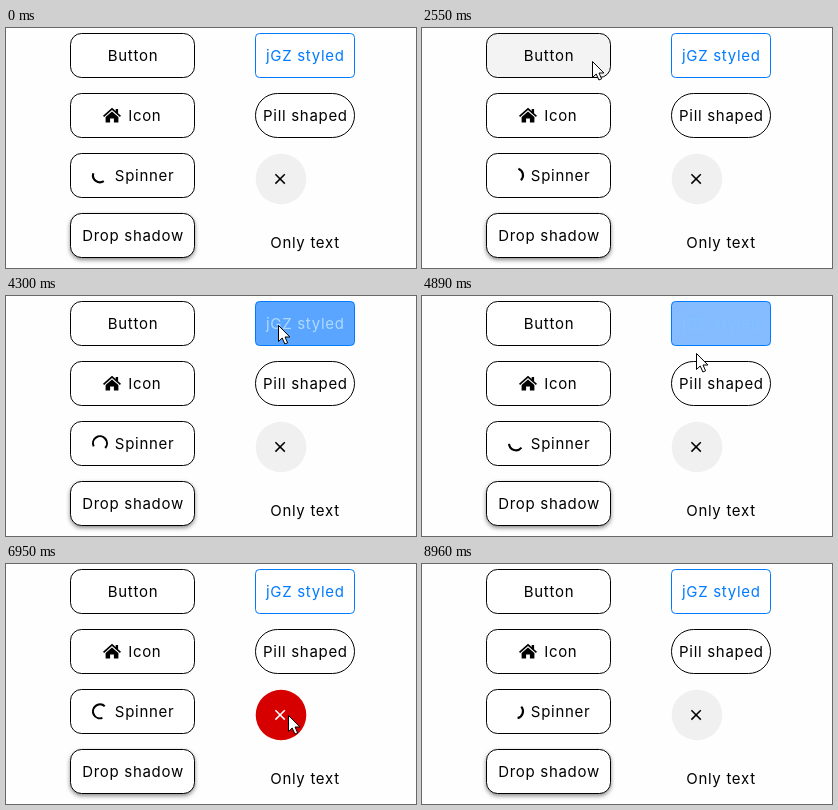
These frames come from a looping animation (410x240 px, 9030 ms). An HTML page:

```html
<!DOCTYPE html>
<html lang="en">
<head>
<meta charset="utf-8">
<title>Button styles</title>
<style>
html, body { margin: 0; width: 100%; height: 100%; overflow: hidden; background: #fefefe; }
svg { display: block; width: 410px; height: 240px; }
text { font: 400 15px Inter, "Open Sans", sans-serif; letter-spacing: .7px; text-anchor: middle; fill: #000; }
.box { fill: #fff; stroke: #000; }
#raised { filter: drop-shadow(0 2px 2px rgba(0, 0, 0, .45)); }
#blue { stroke: #007aff; }
</style>
</head>
<body>
<svg viewBox="0 0 410 240">
  <rect class="box left" x="64.5" y="5.5" width="124" height="44" rx="11"/>
  <rect class="box left" x="64.5" y="65.5" width="124" height="44" rx="11"/>
  <rect class="box left" x="64.5" y="125.5" width="124" height="44" rx="11"/>
  <rect class="box left" id="raised" x="64.5" y="185.5" width="124" height="44" rx="11"/>
  <rect class="box" id="blue" x="249.5" y="5.5" width="99" height="44" rx="4"/>
  <rect class="box" x="249.5" y="65.5" width="99" height="44" rx="22"/>
  <circle id="round" cx="275" cy="151" r="25.3"/>
  <path id="cross" d="M269.4 146.2l9.4 9.4m0-9.4l-9.4 9.4" fill="none" stroke-width="1.5"/>
  <path d="M97 87.7L106 79.8l3.7 3.3v-2h2.4v4.2l2.9 2.4-1.1 1.2-7.9-6.9-7.9 6.9z"/>
  <path d="M99.6 89l6.4-5.5 6.4 5.5v5.6h-4.5v-4.2h-3.8v4.2h-4.5z"/>
  <path id="arc" fill="none" stroke="#000" stroke-width="2.1"/>
  <text x="127" y="33">Button</text>
  <text x="138.8" y="93">Icon</text>
  <text x="138.6" y="153">Spinner</text>
  <text x="127" y="213">Drop shadow</text>
  <text id="label" x="299.3" y="33">jGZ styled</text>
  <text x="299.4" y="93">Pill shaped</text>
  <text x="299" y="220">Only text</text>
  <path id="pointer" d="M.5.5v16l3.7-3.5 2.7 6 2.7-1.2-2.6-5.8h4.9z" fill="#fff" stroke="#000"/>
</svg>
<script>
const LOOP = 9030, STEP = 64.5, SPIN = 1333;
const WHITE = [255, 255, 255], BLACK = [0, 0, 0], GREY = [243, 243, 243], DISC = [240, 240, 240];
const BLUE = [0, 122, 255], SKY = [68, 153, 255], PALE = [175, 218, 255];
const DARK_RED = [198, 0, 0], RED = [214, 0, 0];

// pointer stops: time, x, y
const stops = [
  [400, 276, 244], [1400, 165, 205], [2300, 170, 33], [2850, 170, 33], [3300, 272, 29],
  [4750, 272, 29], [5400, 281, 147], [7600, 282, 152], [8800, 364, 242]
];

const el = id => document.getElementById(id);
const left = [...document.querySelectorAll('.left')];
const lerp = (a, b, f) => a + (b - a) * f;
const ramp = (t, from, to) => Math.max(0, Math.min(1, (t - from) / (to - from)));
const blend = (a, b, f) => a.map((v, i) => lerp(v, b[i], f));
const mix = (a, b, f) => `rgb(${blend(a, b, f).map(Math.round)})`;

function pointer(t) {
  let i = 1;
  while (i < stops.length - 1 && t >= stops[i][0]) i++;
  const a = stops[i - 1], b = stops[i];
  return blend(a.slice(1), b.slice(1), ramp(t, a[0], b[0]));
}

// share of the last 200 ms the pointer spent over a shape
function hover(t, shape) {
  const { x, y, width, height } = shape.getBBox();
  let n = 0;
  for (let i = 0; i < 8; i++) {
    const [px, py] = pointer(t - i * 25);
    if (px >= x && px <= x + width && py >= y && py <= y + height) n++;
  }
  return n / 8;
}

function drawArc(t) {
  const phase = 2 * Math.PI * t / SPIN;
  const mid = 2.74 + 1.9 * phase + 1.25 * Math.cos(phase - 2);
  const len = 3.15 + 1.4 * Math.cos(phase - 2.1);
  const point = r => `${94 + 7 * Math.cos(r)} ${147.3 + 7 * Math.sin(r)}`;
  el('arc').setAttribute('d',
    `M${point(mid - len / 2)}A7 7 0 ${len > Math.PI ? 1 : 0} 1 ${point(mid + len / 2)}`);
}

function draw(t) {
  drawArc(t);
  for (const box of left) box.style.fill = mix(WHITE, GREY, hover(t, box));

  const blue = hover(t, el('blue'));
  el('blue').style.fill = mix(WHITE, blend(SKY, WHITE, .12 * ramp(t, 3590, 4300)), blue);
  el('label').style.fill = mix(BLUE, PALE, blue);

  const red = hover(t, el('round'));
  el('round').style.fill = mix(DISC, blend(DARK_RED, RED, ramp(t, 5600, 6950)), red);
  el('cross').style.stroke = mix(BLACK, WHITE, red);

  const [x, y] = pointer(t).map(Math.round);
  el('pointer').setAttribute('transform', `translate(${x} ${y})`);
}

const start = performance.now();
function tick() {
  const t = (performance.now() - start) % LOOP;
  draw(Math.floor((t + 30) / STEP) * STEP);
  requestAnimationFrame(tick);
}
tick();
</script>
</body>
</html>
```
